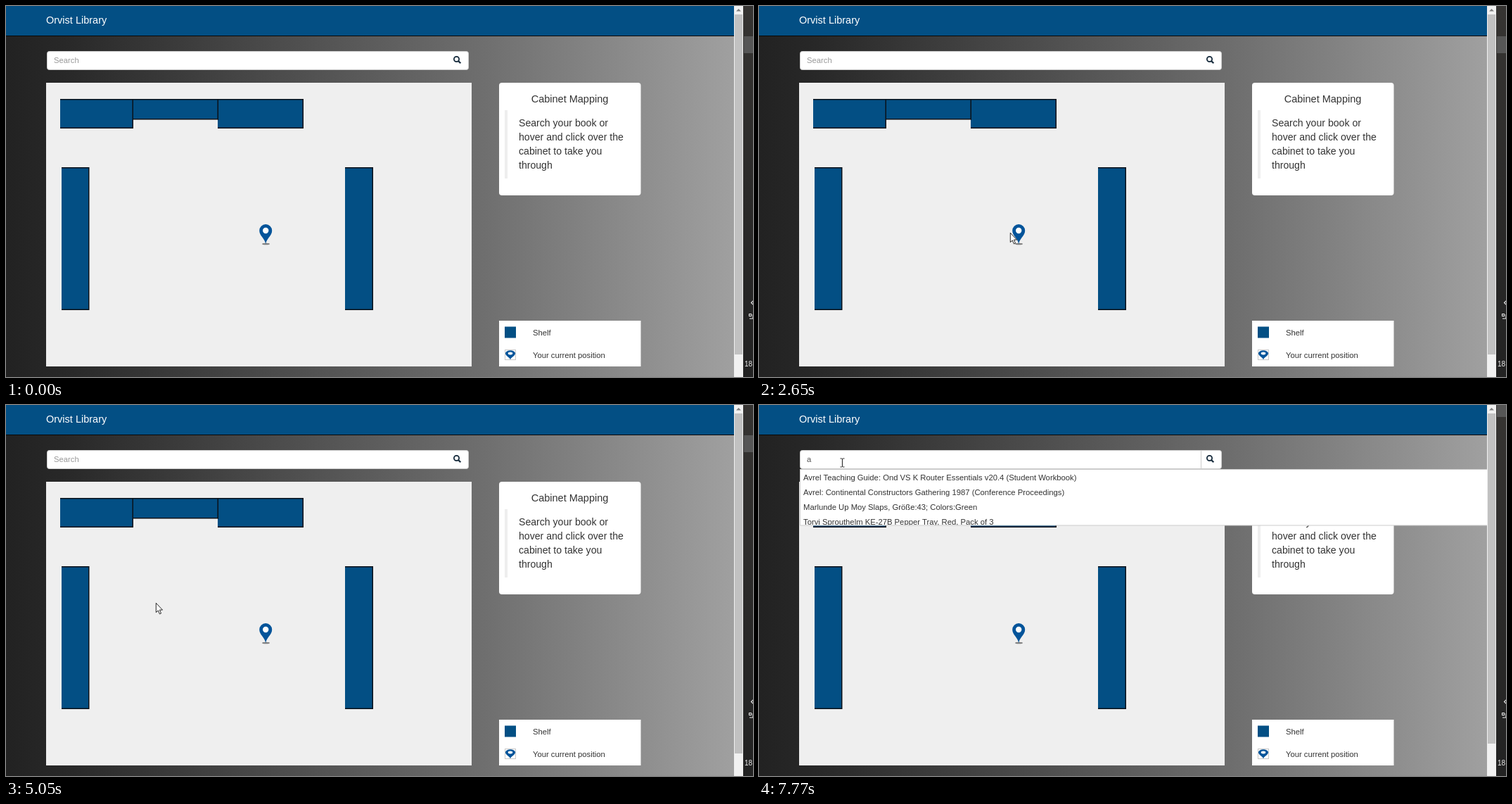
An HTML page with a canvas that plays this animation: 1062x527 px, repeating every 8 s.

```html
<!DOCTYPE html>
<html lang="en">
<head>
<meta charset="utf-8">
<title>Library map</title>
<style>
  html, body { margin: 0; width: 100%; height: 100%; overflow: hidden; background: #222; }
  canvas { display: block; }
</style>
</head>
<body>
<canvas id="stage" width="1062" height="527"></canvas>
<script>
const ctx = document.getElementById('stage').getContext('2d');
const LOOP = 8000;
const BLUE = '#034f84';
const FONT = '"Liberation Sans", Arial, sans-serif';

const HINT = ['Search your book or', 'hover and click over the', 'cabinet to take you', 'through'];
const BOOKS = [
  'Avrel Teaching Guide: Ond VS K Router Essentials v20.4 (Student Workbook)',
  'Avrel: Continental Constructors Gathering 1987 (Conference Proceedings)',
  'Marlunde Up Moy Slaps, Größe:43; Colors:Green',
  'Torvi Sprouthelm KE-27B Pepper Tray, Red, Pack of 3'
];

// Panel contents from a given time on
const PANELS = [
  [0, HINT],
  [860, ['•History', '•SoftSkills', '•FTD']],
  [2100, HINT],
  [3650, ['•EE']],
  [4115, HINT],
  [5053, ['•Math']],
  [6290, HINT]
];

// Pointer moves: start, end, steps, target x, target y
const START = [590, 530];
const MOVES = [
  [170, 940, 11, 521, 331],
  [1320, 1400, 2, 514, 331],
  [1950, 2330, 6, 349.5, 323],
  [2650, 2650, 1, 357, 322],
  [3350, 3810, 7, 340, 148.5],
  [4040, 4040, 1, 340, 187],
  [4115, 4270, 3, 345, 291],
  [4900, 5130, 4, 81, 271],
  [5360, 5520, 3, 102, 271],
  [6140, 6140, 1, 103, 269],
  [6215, 6440, 4, 124, 73.5],
  [7470, 7770, 5, 118.5, 82]
];
const FOCUS = 6670, TYPED = 7150, LISTED = 7470;

function rect(x, y, w, h, color) {
  ctx.fillStyle = color;
  ctx.fillRect(x, y, w, h);
}

function round(x, y, w, h, r, fill, stroke) {
  ctx.beginPath();
  ctx.roundRect(x, y, w, h, r);
  ctx.fillStyle = fill;
  ctx.fill();
  if (stroke) {
    ctx.strokeStyle = stroke;
    ctx.lineWidth = 1;
    ctx.stroke();
  }
}

function text(s, x, y, size, color = '#333', align = 'left') {
  ctx.font = `${size}px ${FONT}`;
  ctx.textAlign = align;
  ctx.fillStyle = color;
  ctx.fillText(s, x, y);
}

function line(points, color, width) {
  ctx.beginPath();
  points.forEach(([x, y]) => ctx.lineTo(x, y));
  ctx.strokeStyle = color;
  ctx.lineWidth = width;
  ctx.stroke();
}

function ellipse(x, y, rx, ry, color) {
  ctx.beginPath();
  ctx.ellipse(x, y, rx, ry, 0, 0, Math.PI * 2);
  ctx.fillStyle = color;
  ctx.fill();
}

function backdrop() {
  const g = ctx.createLinearGradient(0, 0, 1035, 0);
  g.addColorStop(0, '#222');
  g.addColorStop(0.08, '#282828');
  g.addColorStop(0.66, '#6f6f6f');
  g.addColorStop(1, '#a0a0a0');
  rect(0, 0, 1035, 527, g);
  rect(0, 0, 1035, 42, BLUE);
  rect(0, 42, 1035, 1, '#080808');
  text('Orvist Library', 57, 25, 14.5, '#fff');
}

function edge(focused, listed) {
  rect(1035, 0, 13, 527, '#f1f1f1');
  rect(1036, 12, 11, (listed ? 481 : 495) - 12, '#c1c1c1');
  ctx.beginPath();
  ctx.moveTo(1038, 7.5);
  ctx.lineTo(1041.5, 4);
  ctx.lineTo(1045, 7.5);
  ctx.fillStyle = '#808080';
  ctx.fill();

  const g = ctx.createLinearGradient(0, 0, 0, 527);
  g.addColorStop(0, '#363432');
  g.addColorStop(1, '#222');
  rect(1048, 0, 14, 527, g);
  if (focused) rect(1049, 0, 13, 17, '#565656');
  else rect(1049, 43, 13, 24, '#565656');
  line([[1063, 418], [1059.5, 421.5], [1063, 425]], '#eee', 1.2);
  ctx.strokeStyle = '#eee';
  ctx.lineWidth = 1;
  ctx.strokeRect(1056.5, 437.5, 3, 3);
  line([[1057, 444], [1062, 444], [1062, 438]], '#eee', 1.2);
  text('18', 1050, 512, 10, '#eee');
}

function search(t) {
  const focused = t >= FOCUS, typed = t >= TYPED;
  round(58.5, 64.5, 599, 26, 3, '#fff', '#ccc');
  if (focused) rect(628, 65, 1, 25, '#ccc');
  text(typed ? 'a' : 'Search', 68, 81, 11.28, typed ? '#555' : '#999');
  if (focused && !typed) rect(68, 71, 1, 13, '#555');
  ctx.beginPath();
  ctx.arc(640.5, 75.5, 3.6, 0, Math.PI * 2);
  ctx.strokeStyle = '#14293a';
  ctx.lineWidth = 1.8;
  ctx.stroke();
  line([[643.2, 78.2], [646.3, 81.3]], '#14293a', 2.2);
}

function shelf(x, y, w, h) {
  rect(x, y, w, h, '#0a1118');
  rect(x, y + 1.5, w - 1.5, h - 3, BLUE);
}

function pin(x, y, sx, sy) {
  ctx.save();
  ctx.translate(x, y);
  ctx.scale(sx, sy);
  ctx.beginPath();
  ctx.moveTo(0, 19);
  ctx.bezierCurveTo(-1.2, 11, -9, 7.5, -9, 0);
  ctx.arc(0, 0, 9, Math.PI, 0);
  ctx.bezierCurveTo(9, 7.5, 1.2, 11, 0, 19);
  ctx.fillStyle = '#03549a';
  ctx.fill();
  ellipse(0, 0, 4.2, 4.2, '#fff');
  ctx.restore();
}

function map() {
  rect(57, 109, 605, 403, '#efefef');
  shelf(77, 132, 104, 42);
  shelf(180.5, 132, 121.5, 29.5);
  rect(180, 132, 1, 42, '#0a1118');
  shelf(301, 132, 122, 42);
  rect(301, 132, 1, 30, '#0a1118');
  shelf(79, 229, 39.5, 203);
  shelf(482, 229, 40, 203);
  ellipse(369.5, 338, 5.5, 1.3, 'rgba(40,40,40,.55)');
  pin(369.2, 319, 1, 1);
}

function panel(lines) {
  const extra = 20 * lines.length;
  round(701, 109, 201.5, 80 + extra, 4, '#fff');
  text('Cabinet Mapping', 801.5, 137, 14.5, '#333', 'center');
  rect(709, 148, 4, 17 + extra, '#eee');
  lines.forEach((s, i) => text(s, 729, 171 + i * 20.1, 14.1));
}

function legend() {
  rect(701, 447, 201.5, 65, '#fff');
  rect(709, 455.5, 16, 16, BLUE);
  text('Shelf', 749, 467.5, 11.25);
  ctx.strokeStyle = '#c8c8c8';
  ctx.lineWidth = 1;
  ctx.strokeRect(709.5, 488.5, 15, 14);
  pin(717, 493.5, 0.78, 0.47);
  text('Your current position', 749, 499.5, 11.25);
}

function results() {
  rect(58, 91, 977, 80.5, '#ccc');
  rect(59, 92, 976, 78.5, '#fff');
  ctx.save();
  ctx.beginPath();
  ctx.rect(59, 92, 976, 78.5);
  ctx.clip();
  BOOKS.forEach((s, i) => text(s, 63, 106.5 + i * 21, 11.28));
  ctx.restore();
}

function pointerAt(t) {
  let [x, y] = START;
  for (const [from, to, steps, tx, ty] of MOVES) {
    if (t < from) break;
    const done = t >= to ? steps : Math.floor((t - from) / (to - from) * (steps - 1) + 1e-6) + 1;
    const p = (1 - Math.cos(Math.PI * done / steps)) / 2;
    x += (tx - x) * p;
    y += (ty - y) * p;
  }
  return [x, y];
}

function arrow(x, y) {
  const shape = [[0, 0], [0, 13.3], [3, 10.6], [5.1, 15.6], [7.2, 14.7], [5.1, 9.8], [9.2, 9.8]];
  ctx.beginPath();
  shape.forEach(([dx, dy]) => ctx.lineTo(x + dx + 0.3, y + dy + 0.3));
  ctx.closePath();
  ctx.fillStyle = '#fff';
  ctx.fill();
  ctx.strokeStyle = '#111';
  ctx.lineWidth = 0.9;
  ctx.stroke();
}

function beam(x, y) {
  rect(x - 0.6, y - 6, 1.2, 12, '#333');
  for (const dy of [-6.5, 5.5]) {
    rect(x - 3, y + dy, 2.4, 1, '#333');
    rect(x + 0.6, y + dy, 2.4, 1, '#333');
  }
}

function draw(t) {
  const listed = t >= LISTED;
  backdrop();
  search(t);
  map();
  panel(PANELS.findLast(([from]) => t >= from)[1]);
  legend();
  if (listed) results();
  edge(t >= FOCUS, listed);
  const [x, y] = pointerAt(t);
  (y > 64 && y < 91 ? beam : arrow)(x, y);
}

function tick() {
  draw(performance.now() % LOOP);
  requestAnimationFrame(tick);
}
tick();
</script>
</body>
</html>
```
